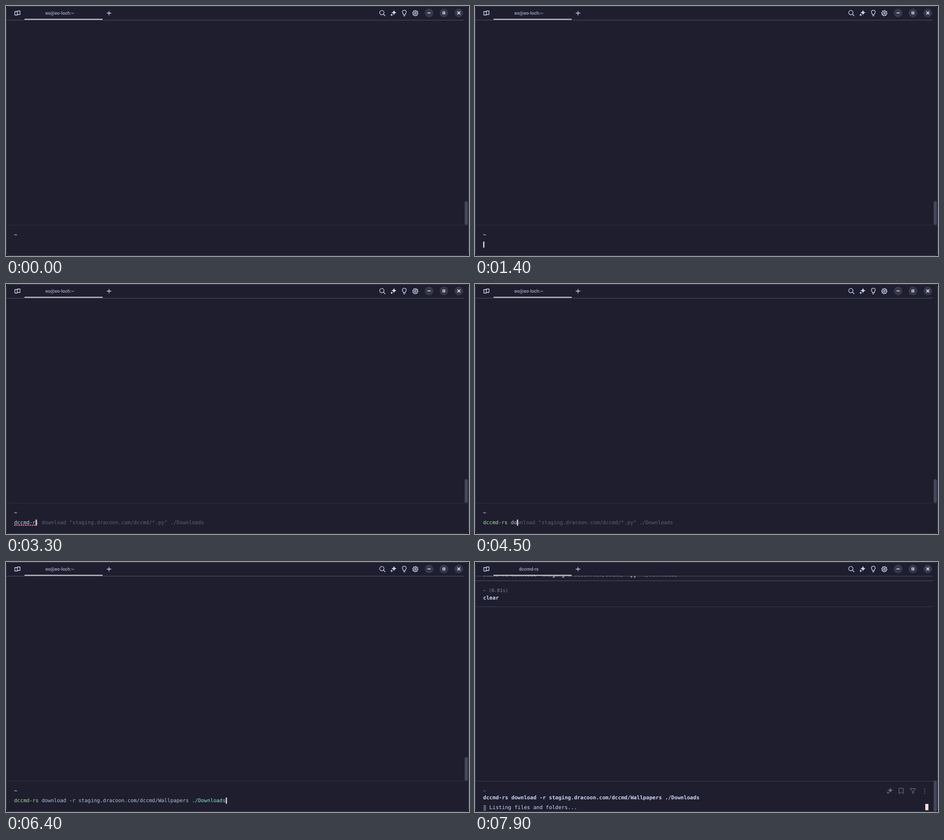
These frames come from a looping animation (800x433 px, 8000 ms). An HTML page:

```html
<!DOCTYPE html>
<html lang="en">
<head>
<meta charset="utf-8">
<title>Terminal download</title>
<style>
  html, body { margin: 0; width: 100%; height: 100%; overflow: hidden; background: #17171f; }
  svg { display: block; width: 100vw; height: 100vh; }
  text { white-space: pre; text-rendering: geometricPrecision; font-family: "DejaVu Sans Mono", monospace; font-size: 9px; fill: #cdd6f4; }
  .title { font: 500 8px Roboto, sans-serif; fill: #a3aac4; text-anchor: middle; }
  .bold { font-weight: bold; }
  .dim { font-size: 8px; fill: #7f849c; }
  .input { font-size: 8.8px; }
  .icon { fill: none; stroke: #cdd6f4; stroke-width: 1.1; stroke-linecap: round; stroke-linejoin: round; }
  .faint { stroke: #6c7086; stroke-width: 1; }
  .rule { stroke: #45475a; }
</style>
</head>
<body>
<svg viewBox="0 0 800 433" preserveAspectRatio="none">
  <defs>
    <clipPath id="below-bar"><rect y="24.5" width="800" height="408"/></clipPath>
    <linearGradient id="sky">
      <stop offset="0" stop-color="#25363d"/>
      <stop offset=".06" stop-color="#304a4a"/>
      <stop offset=".4" stop-color="#355750"/>
      <stop offset=".65" stop-color="#36534c"/>
      <stop offset=".67" stop-color="#273d3c"/>
      <stop offset=".78" stop-color="#2b403e"/>
      <stop offset=".82" stop-color="#5c5a5e"/>
      <stop offset=".86" stop-color="#2b2433"/>
      <stop offset=".92" stop-color="#2f2632"/>
      <stop offset=".96" stop-color="#4a342f"/>
      <stop offset="1" stop-color="#302a30"/>
    </linearGradient>
    <path id="sparkle" d="M0-4.6Q.6-.6 4.6 0Q.6.6 0 4.6Q-.6.6-4.6 0Q-.6-.6 0-4.6Z"/>
  </defs>

  <rect x=".5" y=".5" width="799" height="432" rx="6" fill="#1e1e2e" stroke="#3d3e50"/>

  <g class="icon">
    <path d="M15.2 9.6H19.6V15.6H15.2ZM19.6 10.4V8.6H24.2V14.6H19.6"/>
    <path d="M174.6 12.4H181.4M178 9V15.8"/>
    <circle cx="649.4" cy="11.4" r="3.7"/><path d="M652.2 14.2L655 17"/>
    <path d="M686.8 15.4V14.6C686.8 13.7 684.9 12.6 684.9 10.6A3.3 3.3 0 0 1 691.5 10.6C691.5 12.6 689.6 13.7 689.6 14.6V15.4ZM687.2 17.2H689.2"/>
    <path id="gear"/><circle cx="707.3" cy="12.4" r="1.5"/>
  </g>
  <g fill="#cdd6f4">
    <use href="#sparkle" x="670.4" y="11.4"/>
    <use href="#sparkle" transform="translate(666.4 15.4) scale(.5)"/>
  </g>
  <g fill="#373849">
    <circle cx="731" cy="12" r="7.5"/><circle cx="756.6" cy="12" r="7.5"/><circle cx="782.4" cy="12" r="7.5"/>
  </g>
  <path d="M728.4 12H733.6M780 9.6L784.8 14.4M784.8 9.6L780 14.4" stroke="#cdd6f4" stroke-width="1.5"/>
  <rect x="755" y="10.4" width="3.2" height="3.2" fill="none" stroke="#cdd6f4" stroke-width="1.4"/>
  <text id="title" class="title" x="93" y="15"></text>
  <path class="rule" d="M1 24.5H791"/>
  <path d="M32 23H167" stroke="#e3dfe6" stroke-width="1.6"/>

  <g id="prompt">
    <path d="M1 379.5H799" stroke="#2b2b3c"/>
    <rect x="792.5" y="338" width="5.5" height="41" rx="2.7" fill="#45475a"/>
    <text class="bold input" x="14" y="399">~</text>
    <text id="line" class="input" x="14" y="416"></text>
    <path id="error" stroke="#f38ba8" stroke-width="1.5" stroke-dasharray="2.6 1.2"/>
    <rect id="caret" y="408" width="2" height="10.5" fill="#f5e0dc"/>
  </g>

  <g id="running">
    <g clip-path="url(#below-bar)">
      <text class="bold" x="14" y="24.7">dccmd-rs download "staging.dracoon.com/dccmd/*.py" ./Downloads</text>
    </g>
    <path class="rule" d="M1 32.5H791"/>
    <text class="dim" x="14" y="51.5">~ (0.01s)</text>
    <text class="bold" x="14" y="64.5">clear</text>
    <path d="M1 77.5H791M1 379.5H799" stroke="#36374a"/>
    <rect x="792.5" y="378.5" width="5.5" height="54" rx="2.7" fill="#45475a"/>
    <text class="dim" x="14" y="398.5">~</text>
    <text id="command" class="bold" x="14" y="411.3"></text>
    <g fill="#6c7086">
      <use href="#sparkle" x="717.6" y="395.4"/>
      <use href="#sparkle" transform="translate(713.6 399.4) scale(.5)"/>
      <circle cx="777" cy="392.8" r=".9"/><circle cx="777" cy="396.6" r=".9"/><circle cx="777" cy="400.4" r=".9"/>
    </g>
    <path class="icon faint" d="M733 392H740V401.2L736.5 398.4L733 401.2ZM752 392.4H761.4L757.8 397V401.2L755.6 399.8V397Z"/>
    <g id="listing">
      <path d="M15.7 421.4V431M18.1 421.4V431" stroke="#a6adc8" stroke-width="1.6" stroke-dasharray="1.7 .8"/>
      <text x="24.8" y="428">Listing files and folders...</text>
    </g>
    <rect id="block" y="419" width="5.4" height="11" fill="#f5e0dc"/>
  </g>

  <g id="switch">
    <path d="M1 4H799V11H14Q6 10 1 4Z" fill="url(#sky)"/>
    <g id="stars"></g>
    <path d="M742 4.4H750L748 8H743Z" fill="#e23a63"/>
    <path d="M0 0H800V3.8H0Z" fill="#1e1e2e"/>
    <path d="M2 3.8H798M1 .5H799" stroke="#3d3e50"/>
  </g>
  <path id="pointer" d="M0 0V11.6L4.6 12.8L7.6 6.6Z" fill="#1e1e2e" stroke="#e4e4ea" stroke-linejoin="round"/>
</svg>
<script>
const LOOP = 8000, LEFT = 14, ADVANCE = 8.8 * 0.602;
const OLD = 'dccmd-rs download "staging.dracoon.com/dccmd/*.py" ./Downloads';
const CMD = 'dccmd-rs download -r staging.dracoon.com/dccmd/Wallpapers ./Downloads';
const $ = id => document.getElementById(id);
const show = (id, on) => $(id).setAttribute('visibility', on ? 'inherit' : 'hidden');

// [time, characters typed]
const typing = [
  [0, 0], [2500, 1], [2600, 2], [2800, 3], [2900, 4], [3000, 5], [3200, 6], [3300, 7],
  [3500, 8], [4100, 9], [4300, 10], [4500, 11], [4600, 12], [4700, 13], [4900, 14],
  [5000, 15], [5100, 16], [5300, 17], [5400, 18], [5500, 19], [5600, 21], [6300, CMD.length]
];
const carets = [[0, 0], [1400, 1], [1900, 0], [2400, 1], [6100, 0], [6300, 1]];
const pointers = [[0, null], [700, [726.8, 389]], [800, [500, 405]], [900, [284, 419]],
  [1100, [282, 421]], [1200, [279, 425]], [1300, [276, 429]], [1400, null]];
const at = (steps, t) => steps.findLast(s => s[0] <= t)[1];

function span(text, fill) {
  const node = document.createElementNS('http://www.w3.org/2000/svg', 'tspan');
  node.textContent = text;
  node.setAttribute('fill', fill);
  node.style.fill = fill;
  return node;
}

function drawLine(t) {
  const n = at(typing, t), done = CMD.slice(0, n), end = LEFT + n * ADVANCE;
  const valid = t >= 3600, folder = CMD.lastIndexOf('./');
  const hint = n ? (n > 18 ? CMD : OLD).slice(n) : '';
  $('line').replaceChildren(
    span(done.slice(0, 8), valid ? '#a6e3a1' : '#cdd6f4'),
    span(done.slice(8, folder), '#bac2de'),
    span(done.slice(folder), t >= 6400 ? '#94e2d5' : '#bac2de'),
    span(hint, '#5f6278'));
  $('error').setAttribute('d', `M${LEFT} 417.8H${end}`);
  show('error', n && !valid);
  $('caret').setAttribute('x', end + .2);
  show('caret', at(carets, t));
}

let last = -1;
function render(t) {
  const step = Math.floor(t / 100) * 100;
  if (step === last) return;
  last = step;
  const running = step >= 6500, listing = step >= 7900, spot = at(pointers, step);
  $('title').textContent = running ? 'dccmd-rs' : 'eo@eo-loch:~';
  show('prompt', !running);
  show('running', running);
  drawLine(step);
  if (running) {
    show('error', false);
    show('caret', false);
  }
  show('listing', running && listing);
  show('block', step >= 6700);
  $('block').setAttribute('x', listing ? 778 : 14.6);
  show('switch', step === 700);
  show('pointer', spot);
  if (spot) $('pointer').setAttribute('transform', `translate(${spot})`);
}

function buildGear() {
  const points = Array.from({ length: 32 }, (_, i) => {
    const a = (i + .5) * Math.PI / 16, r = i % 4 < 2 ? 4.7 : 3.6;
    return `${707.3 + r * Math.cos(a)} ${12.4 + r * Math.sin(a)}`;
  });
  $('gear').setAttribute('d', `M${points.join('L')}Z`);
}

function buildStars() {
  let seed = 11;
  const random = () => (seed = seed * 16807 % 2147483647) / 2147483647;
  for (let i = 0; i < 130; i++) {
    const star = document.createElementNS('http://www.w3.org/2000/svg', 'circle');
    const place = { cx: 14 + random() * 780, cy: 4.5 + random() * 6, r: .3 + random() * .45,
      fill: '#c4d4cc', opacity: .3 + random() * .6 };
    for (const key in place) star.setAttribute(key, place[key]);
    $('stars').append(star);
  }
}

buildGear();
buildStars();
$('command').textContent = CMD;
const start = performance.now();
function tick() {
  render((performance.now() - start) % LOOP);
  requestAnimationFrame(tick);
}
tick();
</script>
</body>
</html>
```
